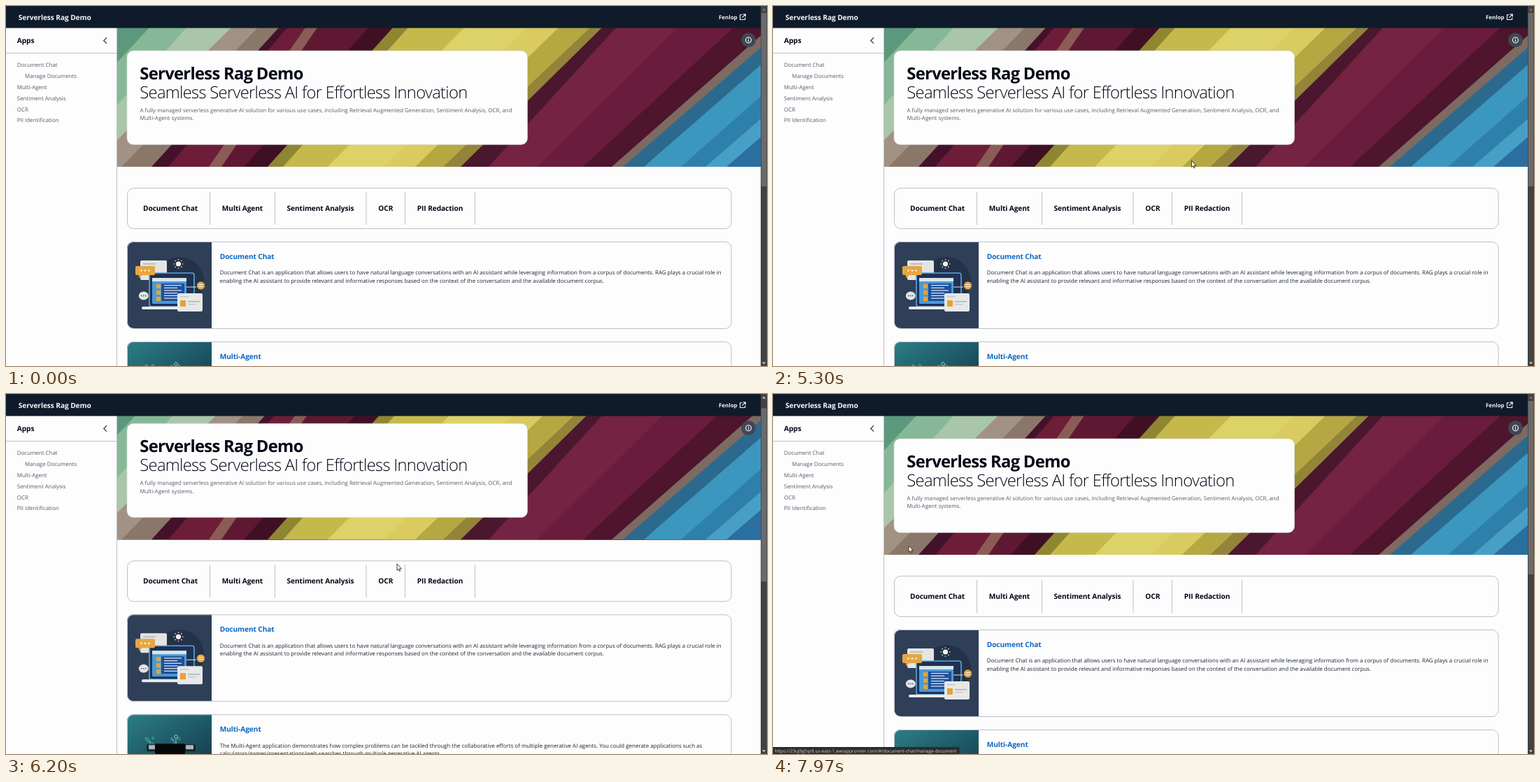
Recreate the animation shown at these times as an HTML page. Size 1088 px wide and 515 px high, loop 8 s.

```html
<!DOCTYPE html>
<html lang="en">
<head>
<meta charset="utf-8">
<title>Serverless Rag Demo</title>
<style>
html, body { margin: 0; width: 100%; height: 100%; overflow: hidden; background: #fdfdfd; }
svg { display: block; width: 100%; height: 100%; }
text { font: 7.93px "Open Sans", "Noto Sans", sans-serif; fill: #1b2430; text-rendering: geometricPrecision; white-space: pre; }
.b { font-weight: 700; }
.h { font-size: 10.2px; font-weight: 700; letter-spacing: -.01em; fill: #000716; }
.link { fill: #0d66c4; }
.big, .light { font-size: 23.8px; letter-spacing: -.03em; fill: #000716; }
.big { font-weight: 700; }
.light { font-weight: 300; }
.soft { fill: #545d69; }
.w { fill: #f4f5f7; }
.line { fill: none; stroke: #bcc0cc; }
#status text { font-size: 6.46px; fill: #d6d6d6; }
</style>
</head>
<body>
<svg id="stage" viewBox="0 0 1088 515" preserveAspectRatio="none"></svg>
<script>
const rect = (x, y, w, h, fill, r = 0, more = '') =>
  `<rect x="${x}" y="${y}" width="${w}" height="${h}" rx="${r}" fill="${fill}" ${more}/>`;
const dot = (x, y, r, fill, more = '') => `<circle cx="${x}" cy="${y}" r="${r}" fill="${fill}" ${more}/>`;
const path = (d, stroke, width = 1, fill = 'none', more = '') =>
  `<path d="${d}" stroke="${stroke}" stroke-width="${width}" fill="${fill}" ${more}/>`;
const text = (x, y, s, cls = '', id = '') => `<text x="${x}" y="${y}" class="${cls}" id="${id}">${s}</text>`;
const repeat = (n, draw) => Array.from({ length: n }, (_, i) => draw(i)).join('');

// Diagonal bands: left edge at the top, left edge at the bottom, colour.
const bands = [
  [150, -40, '#5c997c'], [205, 20, '#86b898'], [258, 80, '#a9c6a8'], [322, 120, '#a19283'], [360, 165, '#8b7769'],
  [390, 208, '#43122a'], [402, 232, '#6d1d38'], [428, 290, '#8b5c56'], [445, 308, '#5f1832'], [518, 340, '#3f1024'],
  [553, 374, '#8f8632'], [575, 396, '#c6b94c'], [655, 460, '#ddd268'], [745, 540, '#d9cb60'], [790, 585, '#b5a742'],
  [835, 625, '#93843a'], [852, 650, '#4a172e'], [872, 690, '#742342'], [960, 760, '#691c3b'], [1040, 825, '#4e152d'],
  [1092, 866, '#7d6a62'], [1112, 882, '#2b6a8e'], [1140, 912, '#3c97bf'], [1190, 965, '#2e80aa'],
  [1230, 1000, '#489fc5'], [1260, 1030, '#2b6ea0']
];
const banner = rect(159, 31, 920, 199, '#417f60') +
  bands.map(([a, b, c]) => `<path d="M${a} 31H1300V230H${b}Z" fill="${c}"/>`).join('');

const chatArt = () =>
  dot(248, 394, 35, '#243249') +
  rect(192, 364, 38, 28, '#e4e5e3', 2) + rect(196, 368, 18, 2, '#b8bfc6') +
  rect(205, 382, 64, 48, '#1f3152', 3, 'stroke="#5aa6de" stroke-width="1.6"') +
  rect(209, 389, 49, 37, '#4a9ad6', 1) + rect(209, 389, 49, 5, '#dbe5ec') + rect(222, 397, 33, 25, '#1f4f9a') +
  repeat(3, i => rect(215, 398 + i * 9, 6, 6, '#e5a33b')) +
  repeat(6, i => rect(226, 399 + i * 3.7, i % 2 ? 19 : 25, 1.2, '#e1ebf5')) +
  rect(194, 430, 82, 4, '#e9ebec', 2) +
  rect(185, 372, 28, 13, '#e6a642', 2) + path('M190 384v5l6-5z', 'none', 0, '#e6a642') +
  repeat(3, i => dot(193.5 + i * 5.5, 378.5, 1.2, '#fff')) +
  dot(246.5, 369, 3.6, '#f2f1e5') +
  repeat(8, i => dot(246.5 + 6.2 * Math.cos(i * Math.PI / 4), 369 + 6.2 * Math.sin(i * Math.PI / 4), .8, '#f2f1e5')) +
  '<ellipse cx="196.8" cy="414.5" rx="7" ry="6" fill="#e3e5e6"/>' +
  repeat(3, i => dot(193.7 + i * 3, 414.5, .9, '#54647b')) +
  path('M258 402h14', '#dfe5eb') + dot(278.5, 400, 5.7, '#e2a544') +
  rect(275.5, 398, 6, 1, '#fff') + rect(275.5, 401, 6, 1, '#fff') +
  rect(245, 411, 36, 26, '#e7e8e7', 2) + rect(249, 421, 8, 9, '#e4a23a') +
  rect(260, 422, 17, 1.5, '#abb2bb') + rect(260, 426, 12, 1.5, '#c5cacf') + rect(249, 415, 12, 1.5, '#c5cacf');

const agentArt = () =>
  repeat(12, i => dot(200 + (i * 37) % 72, 514 + (i * 11) % 10, 1 + i % 3 * .5, 'none', 'stroke="#5fb0b6" stroke-width=".8"')) +
  dot(243, 512, 2.3, 'none', 'stroke="#8fd0d2"') + path('M243 514v9', '#65b0b5', .8) +
  rect(201, 523, 70, 10, '#17242c', 2) + rect(204, 524, 11, 6, '#a8b9bb', 1) + rect(257, 524, 11, 6, '#a8b9bb', 1) +
  rect(213, 522, 43, 62, '#050809', 2) + rect(190, 584, 89, 8, '#183039', 3);

const cards = [
  ['Document Chat', '#2f3f58', chatArt,
    'Document Chat is an application that allows users to have natural language conversations with an AI assistant while leveraging information from a corpus of documents. RAG plays a crucial role in',
    'enabling the AI assistant to provide relevant and informative responses based on the context of the conversation and the available document corpus.'],
  ['Multi-Agent', 'url(#teal)', agentArt,
    'The Multi-Agent application demonstrates how complex problems can be tackled through the collaborative efforts of multiple generative AI agents. You could generate applications such as',
    'calculators/games/presentations/web searches through multiple generative AI agents.']
];
const card = ([title, color, art, one, two], i) => {
  const y = 337 + i * 143;
  return `<path d="M294 ${y}H182a9 9 0 0 0-9 9v106a9 9 0 0 0 9 9H294Z" fill="${color}"/>` + art() +
    rect(173.5, y + .5, 863.5, 124, 'none', 9, 'class="line"') +
    text(305.7, y + 24.7, title, 'h link') + text(305.7, y + 47.4, one) + text(305.7, y + 58.7, two);
};

const tabs = [[196, 'Document Chat', 291.5], [308.8, 'Multi Agent', 384.5], [401.6, 'Sentiment Analysis', 515],
  [532.3, 'OCR', 570.5], [587.8, 'PII Redaction', 670.5]];
const menu = [[15.8, 'Document Chat'], [27, 'Manage Documents'], [15.8, 'Multi-Agent'],
  [15.8, 'Sentiment Analysis'], [15.8, 'OCR'], [15.8, 'PII Identification']];

document.getElementById('stage').innerHTML =
  `<defs><linearGradient id="teal" x2=".6" y2="1"><stop stop-color="#2c7f85"/><stop offset=".45" stop-color="#1f5a68"/><stop offset="1" stop-color="#122f3d"/></linearGradient></defs>` +
  rect(0, 0, 1088, 515, '#fdfdfd') +
  `<g id="page">${banner}` +
  rect(173, 64, 572.5, 134.3, '#fdfdfd', 9, 'stroke="#d5d7de" stroke-width=".6"') +
  text(191.3, 104.6, 'Serverless Rag Demo', 'big') +
  text(191.3, 132, 'Seamless Serverless AI for Effortless Innovation', 'light') +
  text(191.5, 152, 'A fully managed serverless generative AI solution for various use cases, including Retrieval Augmented Generation, Sentiment Analysis, OCR, and', 'soft') +
  text(191.5, 163.3, 'Multi-Agent systems.', 'soft') +
  rect(173.5, 260.5, 863.5, 58, 'none', 9, 'class="line"') +
  tabs.map(([x, s, end]) => text(x, 293.2, s, 'h') + path(`M${end} 266V313`, '#bcc0cc')).join('') +
  cards.map(card).join('') + '</g>' +
  rect(0, 31, 159, 484, '#fdfdfd') + path('M158.5 31V515M0 67.5H158', '#bcc0cc') +
  text(15.8, 53.2, 'Apps', 'h') + path('M144 45.2l-4.2 4.2 4.2 4.2', '#333d4a', 1.3) +
  menu.map(([x, s], i) => text(x, 87.3 + i * 15.83, s, 'soft', 'item' + i)).join('') +
  rect(0, 0, 1079, 31.5, '#0f1b2a') + text(17.8, 19.7, 'Serverless Rag Demo', 'h w') + text(1019, 18.7, 'Fenlop', 'b w') +
  path('M1052.5 12.5h-3v7h7.2v-3M1053.5 11.8h3.8v3.8M1057 12l-4.6 4.6', '#f4f5f7', 1.1) +
  dot(1061.5, 48.7, 10.4, '#3f4754') + dot(1061.5, 48.7, 4, 'none', 'stroke="#fff" stroke-width="1.1"') +
  path('M1061.5 48v3M1061.5 46.2v1', '#fff', 1.1) +
  rect(1079, 0, 9, 515, '#424242') + rect(1079.7, 10, 7.6, 248, '#6b6b6b', 0, 'id="thumb"') +
  path('M1081 6.5l2.5-3 2.5 3z', 'none', 0, '#7d7d7d', 'id="up"') + path('M1081 509.5l2.5 3 2.5-3z', 'none', 0, '#d0d0d0') +
  '<g id="status">' + rect(0, 505, 266.5, 10, '#2c2c2e') +
  text(2.6, 512.6, 'https://23uj9g5qr8.us-east-1.awsapprunner.com/#/document-chat/manage-document') + '</g>' +
  '<g id="cursor">' + path('M0 0V9.3L2.1 7.4 3.5 10.6 4.9 10 3.5 6.9H6.4Z', '#111', .8, '#fff') + '</g>';

// Tracks are lists of time and values, eased between neighbours.
// The wheel moves the page one notch down and back.
const scrollTrack = [[5930, 0], [6090, 56.7], [6120, 56.7], [6260, 0]];
const cursorTrack = [[4420, 1000, 0], [5500, 559, 243], [6270, 559, 243], [6330, 533, 230], [6500, 533, 230],
  [6970, 37, 78], [7270, 40, 82], [7480, 62, 98], [7650, 66, 101], [7970, 194, 217]];
const at = (track, t) => {
  const i = track.findIndex(k => k[0] > t);
  if (i < 1) return (i ? track[track.length - 1] : track[0]).slice(1);
  const [a, b] = [track[i - 1], track[i]], u = (t - a[0]) / (b[0] - a[0]), e = u * u * (3 - 2 * u);
  return a.slice(1).map((v, k) => v + (b[k + 1] - v) * e);
};

const $ = id => document.getElementById(id);
const show = (id, on) => $(id).setAttribute('visibility', on ? 'visible' : 'hidden');
const start = performance.now();
function draw() {
  const t = (performance.now() - start) % 8000;
  const [scroll] = at(scrollTrack, t), [x, y] = at(cursorTrack, t);
  $('page').setAttribute('transform', `translate(0 ${-scroll})`);
  $('thumb').setAttribute('y', 10 + scroll * .48);
  $('up').setAttribute('fill', scroll > 0 ? '#d0d0d0' : '#7d7d7d');
  $('cursor').setAttribute('transform', `translate(${x} ${y})`);
  show('cursor', t > 4420);
  show('status', t >= 7340);
  menu.forEach(([left], i) => {
    const top = 77 + i * 15.83;
    const over = x > left && x < left + 75 && y >= top && y < top + 15.83;
    $('item' + i).style.fill = over ? '#3a78c4' : '';
  });
  requestAnimationFrame(draw);
}
draw();
</script>
</body>
</html>
```
